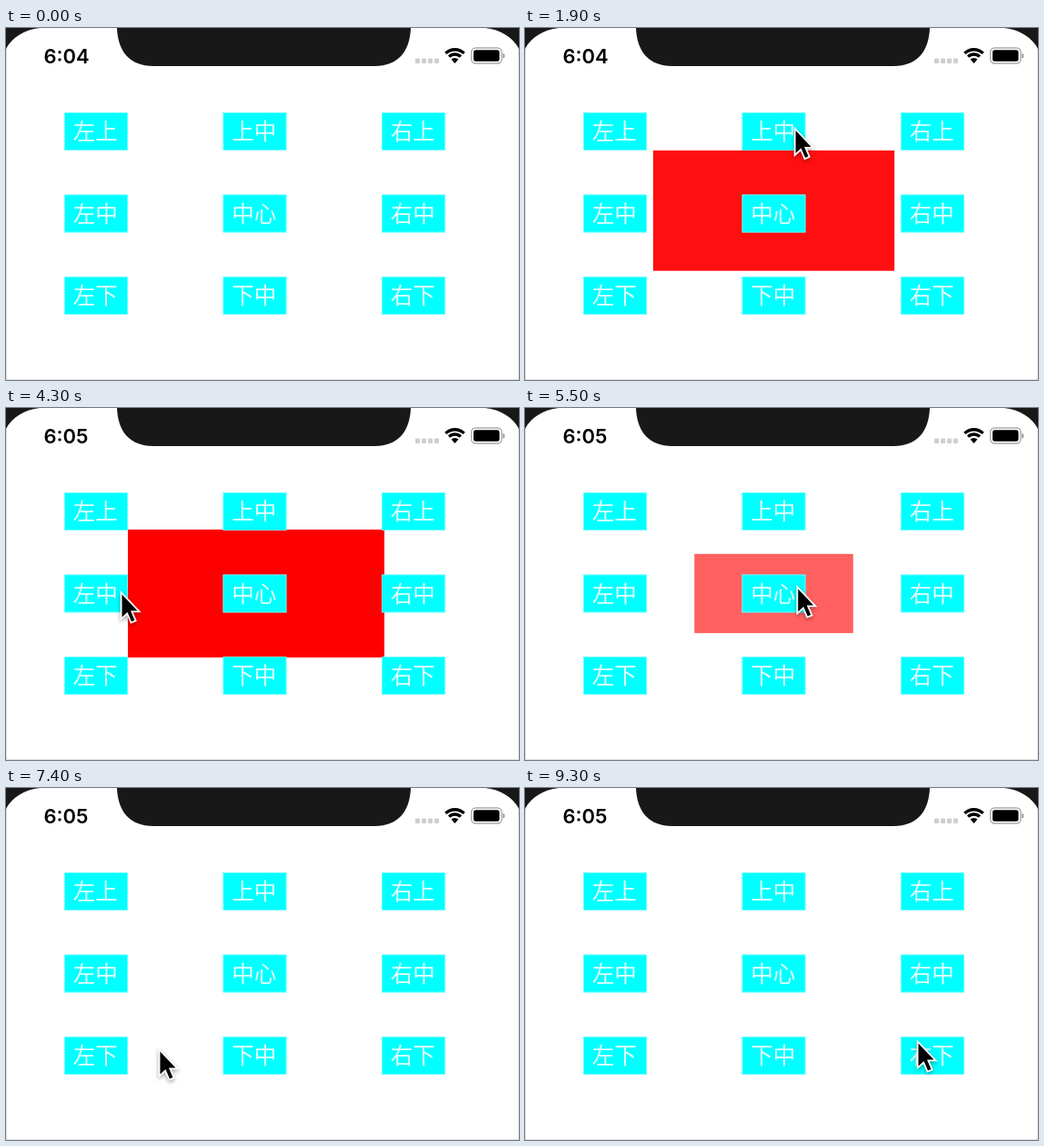
An HTML page with a canvas that plays this animation: 564x388 px, repeating every 9400 ms.

```html
<!DOCTYPE html>
<html lang="zh">
<head>
<meta charset="utf-8">
<style>
html, body { margin: 0; width: 100%; height: 100%; overflow: hidden; background: #fff; }
canvas { display: block; }
</style>
</head>
<body>
<canvas id="stage" width="564" height="388"></canvas>
<script>
const ctx = document.getElementById('stage').getContext('2d');
const LOOP = 9400, STEP = 100;
const FADE = 250, HOLD = 155, LINGER = 100, TRAVEL = 600;
const GRID = { x: 64, y: 93, dx: 174.5, dy: 90.5, w: 70, h: 42 };
const POPUP = { w: 282, h: 141 };
const ENTRY = [330, 400];

// Each row is tapped left to right: when its first popup is open, the time
// between taps, and the pointer's place on the left and right buttons.
const rows = [
  { labels: ['左上', '上中', '右上'], first: 1035, gap: 902, from: [126, 110], to: [437, 111] },
  { labels: ['左中', '中心', '右中'], first: 4290, gap: 950, from: [127, 203], to: [441, 192] },
  { labels: ['左下', '下中', '右下'], first: 7000, gap: 880, from: [110, 290], to: [432, 279] }
];

const clamp = v => Math.min(1, Math.max(0, v));
const mix = (a, b, p) => a + (b - a) * p;
const mixPoint = (a, b, p) => a.map((v, i) => mix(v, b[i], p));
function ease(v) {
  v = clamp(v);
  return v * v * (3 - 2 * v);
}

const items = rows.flatMap((row, r) => row.labels.map((label, c) => ({
  label, c, r,
  x: GRID.x + GRID.dx * c,
  y: GRID.y + GRID.dy * r,
  full: row.first + row.gap * c,
  pointer: mixPoint(row.from, row.to, [0, 0.55, 1][c])
})));

function polygon(points) {
  ctx.beginPath();
  points.forEach(([x, y]) => ctx.lineTo(x, y));
  ctx.closePath();
}

function roundRect(x, y, w, h, r) {
  ctx.beginPath();
  ctx.roundRect(x, y, w, h, r);
}

function drawPhone() {
  ctx.fillStyle = '#fff';
  ctx.fillRect(0, 0, 564, 388);
  ctx.strokeStyle = '#dedede';
  ctx.lineWidth = 1;
  ctx.strokeRect(0.5, -1, 563, 388.5);

  ctx.fillStyle = '#181818';
  for (const side of [0, 1]) {
    ctx.save();
    if (side) {
      ctx.translate(564, 0);
      ctx.scale(-1, 1);
    }
    ctx.beginPath();
    ctx.moveTo(0, 0);
    ctx.lineTo(37, 0);
    ctx.bezierCurveTo(20, 2, 7, 10, 0, 23);
    ctx.fill();
    ctx.restore();
  }
  ctx.beginPath();
  ctx.moveTo(122, 0);
  ctx.bezierCurveTo(123, 26, 136, 42, 162, 42);
  ctx.lineTo(405, 42);
  ctx.bezierCurveTo(431, 42, 444, 26, 445, 0);
  ctx.fill();
}

function drawStatus(t) {
  ctx.fillStyle = '#000';
  ctx.font = '600 22px Inter, sans-serif';
  ctx.textAlign = 'left';
  ctx.fillText(t < 2400 ? '6:04' : '6:05', 41.5, 38.7);

  ctx.fillStyle = '#cfcfcf';
  for (let i = 0; i < 4; i++) {
    roundRect(450 + i * 7, 33.5, 5, 5.5, 1);
    ctx.fill();
  }

  ctx.fillStyle = ctx.strokeStyle = '#000';
  ctx.lineWidth = 3.4;
  for (const r of [14.3, 9]) {
    ctx.beginPath();
    ctx.arc(493.5, 38, r, -Math.PI * 0.75, -Math.PI * 0.25);
    ctx.stroke();
  }
  ctx.beginPath();
  ctx.moveTo(493.5, 39);
  ctx.arc(493.5, 38.5, 5.6, -Math.PI * 0.75, -Math.PI * 0.25);
  ctx.fill();

  ctx.strokeStyle = '#aaa';
  ctx.lineWidth = 1.4;
  roundRect(511.7, 22, 33.3, 17, 4.5);
  ctx.stroke();
  roundRect(514, 24.3, 28.5, 12.4, 2.5);
  ctx.fill();
  ctx.fillStyle = '#999';
  roundRect(546.3, 28, 2, 5.5, [0, 2, 2, 0]);
  ctx.fill();
}

// A popup grows out of the side or corner of its button that faces the centre.
function drawPopup({ c, r, x, y, full }, t) {
  const level = ease((t - full + FADE) / FADE) - ease((t - full - HOLD) / FADE);
  if (level <= 0) return;
  const w = POPUP.w * level, h = POPUP.h * level;
  const anchorX = x + GRID.w * (1 - c / 2);
  const anchorY = y + GRID.h * (1 - r / 2);
  ctx.globalAlpha = level;
  ctx.fillStyle = '#f00';
  ctx.fillRect(anchorX - w * c / 2, anchorY - h * r / 2, w, h);
  ctx.globalAlpha = 1;
}

function drawButton({ label, x, y }) {
  ctx.fillStyle = '#0ff';
  ctx.fillRect(x, y, GRID.w, GRID.h);
  ctx.strokeStyle = 'rgba(255,255,255,.4)';
  ctx.lineWidth = 1;
  ctx.strokeRect(x + 0.5, y + 0.5, GRID.w - 1, GRID.h - 1);
  ctx.fillStyle = 'rgba(255,255,255,.9)';
  ctx.font = '300 24.5px "Noto Sans CJK SC", "Noto Sans CJK", sans-serif';
  ctx.textAlign = 'center';
  ctx.fillText(label, x + 34.3, y + 30.3);
}

// The pointer reaches each button as its popup starts and lingers as it closes.
function pointerAt(t) {
  let place = ENTRY, left = 0;
  for (const { full, pointer } of items) {
    const arrive = full - FADE;
    const depart = Math.max(left, arrive - TRAVEL);
    place = mixPoint(place, pointer, ease((t - depart) / (arrive - depart)));
    if (t < arrive) break;
    left = full + HOLD + LINGER;
  }
  return place;
}

function drawPointer(t) {
  const [x, y] = pointerAt(t);
  ctx.save();
  ctx.translate(x + 0.5, y + 1.5);
  polygon([[0, 1], [0, 26], [6, 20.5], [10.5, 31], [14, 29.5], [9.5, 19], [17, 19]]);
  ctx.shadowColor = 'rgba(0,0,0,.35)';
  ctx.shadowBlur = 4;
  ctx.shadowOffsetY = 2;
  ctx.strokeStyle = '#fff';
  ctx.lineWidth = 3.6;
  ctx.stroke();
  ctx.shadowColor = 'transparent';
  ctx.fillStyle = '#000';
  ctx.fill();
  ctx.restore();
}

function draw(t) {
  drawPhone();
  drawStatus(t);
  items.forEach(item => drawPopup(item, t));
  items.forEach(drawButton);
  drawPointer(t);
}

const start = performance.now();
function tick() {
  const t = (performance.now() - start) % LOOP;
  draw(Math.floor(t / STEP) * STEP);
  requestAnimationFrame(tick);
}
tick();
</script>
</body>
</html>
```
